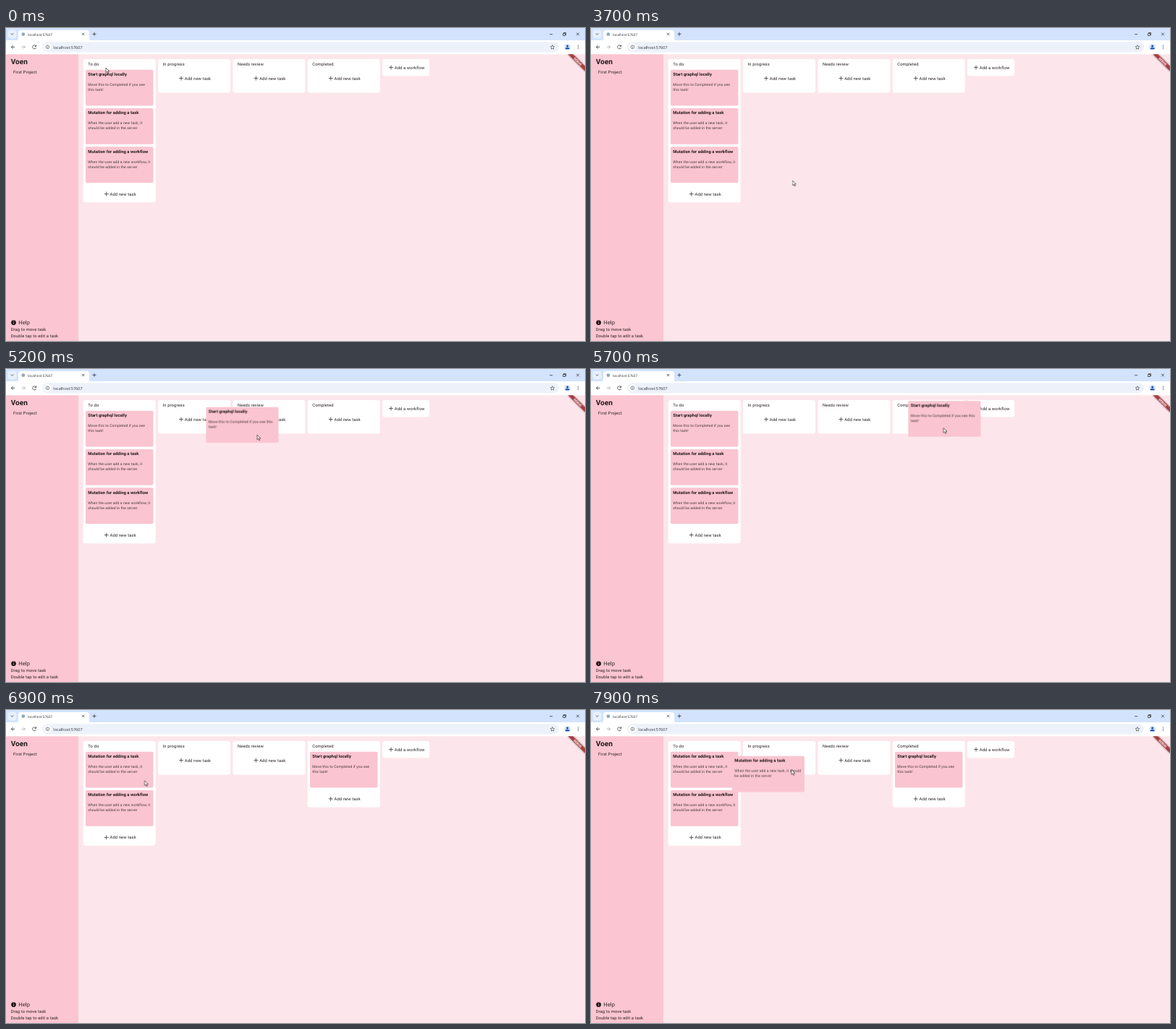
These frames come from a looping animation (800 by 433 pixels, 8000 ms). An HTML page:

```html
<!DOCTYPE html>
<html lang="en">
<head>
<meta charset="utf-8">
<title>Task board</title>
<style>
  html, body { margin: 0; width: 100%; height: 100%; overflow: hidden; background: #fde6eb; }
  svg { display: block; }
  text { font: 5.83px Roboto, sans-serif; letter-spacing: .104px; fill: #2a2224; text-rendering: geometricPrecision; white-space: pre; }
  .title { font-weight: 700; letter-spacing: .04px; fill: #20181a; }
  .body { font-size: 5px; fill: #44383b; }
  .chrome { font-family: "Open Sans", sans-serif; letter-spacing: 0; fill: #2b2e33; }
  .card { fill: #fac4d0; }
  .line { fill: none; stroke: #33363a; stroke-width: .8; }

  #before, #after, #drag1, #drag2 { animation: 8s step-end infinite; }
  #before { animation-name: before; }
  #after { animation-name: after; }
  #drag1 { animation-name: show1; }
  #drag2 { animation-name: show2; }
  #drag1 > g { animation: move1 8s infinite; }
  #drag2 > g { animation: move2 8s infinite; }
  #cursor { animation: cursor 8s infinite; }

  @keyframes before { 0% { opacity: 1 } 73.75%, 100% { opacity: 0 } }
  @keyframes after { 0% { opacity: 0 } 73.75%, 100% { opacity: 1 } }
  @keyframes show1 { 0% { opacity: 0 } 61.25% { opacity: 1 } 73.75%, 100% { opacity: 0 } }
  @keyframes show2 { 0% { opacity: 0 } 93.75%, 100% { opacity: 1 } }

  /* One step per 100 ms */
  @keyframes move1 {
    0%, 61.25% { transform: translate(129px, 57.7px); animation-timing-function: steps(6) }
    68.75% { transform: translate(424px, 47px); animation-timing-function: steps(2) }
    71.25%, 100% { transform: translate(438.4px, 44px) }
  }
  @keyframes move2 {
    0%, 93.75% { transform: translate(112px, 60px); animation-timing-function: steps(2) }
    96.25% { transform: translate(145px, 67px); animation-timing-function: steps(2) }
    98.75%, 100% { transform: translate(195px, 63.7px) }
  }
  @keyframes cursor {
    0% { transform: translate(138px, 55px); animation-timing-function: steps(2) }
    2.5% { transform: translate(106px, 56.5px); animation-timing-function: step-end }
    7.5% { transform: translate(107px, 57px); animation-timing-function: step-end }
    8.75%, 28.75% { transform: translate(108px, 57px); animation-timing-function: steps(5) }
    35% { transform: translate(190px, 164px); animation-timing-function: steps(4) }
    40% { transform: translate(268px, 290px); animation-timing-function: steps(3) }
    43.75% { transform: translate(282px, 240px); animation-timing-function: steps(2) }
    46.25%, 50% { transform: translate(278.5px, 211px); animation-timing-function: steps(5) }
    56.25%, 58.75% { transform: translate(172px, 97px); animation-timing-function: steps(2) }
    61.25% { transform: translate(222px, 97px); animation-timing-function: steps(6) }
    68.75% { transform: translate(472px, 85px); animation-timing-function: steps(2) }
    71.25%, 76.25% { transform: translate(487px, 81.5px); animation-timing-function: steps(4) }
    81.25% { transform: translate(360px, 100px); animation-timing-function: steps(2) }
    83.75% { transform: translate(195px, 118px); animation-timing-function: steps(2) }
    86.25%, 92.5% { transform: translate(191.5px, 97.7px); animation-timing-function: steps(5) }
    98.75%, 100% { transform: translate(277px, 82.5px) }
  }
</style>
</head>
<body>
<svg width="800" height="433" viewBox="0 0 800 433">
  <defs>
    <clipPath id="page"><rect y="36.3" width="800" height="397"/></clipPath>
    <filter id="blur" x="-50%" y="-100%" width="200%" height="300%"><feGaussianBlur stdDeviation="1.2"/></filter>
  </defs>

  <rect width="800" height="433" fill="#fde6eb"/>
  <rect y="36" width="100" height="397" fill="#fbc5d1"/>

  <!-- Browser window -->
  <rect width="800" height="17.5" fill="#d3e3fd"/>
  <rect y="17" width="800" height="19.3" fill="#fff"/>
  <path d="M13.5 17.5q3.5 0 3.5-3.5V6.500q0-3.500 3.500-3.500H111.500q3.500 0 3.500 3.500V14q0 3.500 3.500 3.500z" fill="#fff"/>
  <rect x="2.700" y="2.700" width="11.600" height="11.600" rx="3.500" fill="#e8f0fe"/>
  <path class="line" d="M6.700 7.500l1.800 1.800 1.800-1.800"/>
  <circle cx="23.800" cy="8.700" r="2.400" fill="#93a7bb"/>
  <text class="chrome" x="30" y="10.500" style="font-size:4.680px">localhost:57607</text>
  <path class="line" d="M105 6.800l3.200 3.200m0-3.200l-3.200 3.200M119.500 8.400h5m-2.500-2.500v5"/>
  <path class="line" stroke-width=".6" d="M751.200 8.700h4M769.600 7.500h3v3h-3zM770.600 7.300V6.500h3v3h-.8M788.200 6.600l3.700 3.700m0-3.700l-3.700 3.700"/>
  <path class="line" d="M12.200 26.300H7.300m2.400-2.400l-2.400 2.400 2.400 2.400"/>
  <path class="line" style="stroke:#a9abae" d="M21.500 26.300h4.900m-2.400-2.400l2.400 2.400-2.400 2.400"/>
  <path class="line" d="M41.300 25a2.500 2.500 0 1 0 .2 2.200M41.700 23.400v2h-2"/>
  <rect x="50" y="19.200" width="714" height="14.200" rx="7.100" fill="#edf2fa"/>
  <circle cx="57.400" cy="26.300" r="5" fill="#fff"/>
  <circle class="line" cx="57.400" cy="26.300" r="2.400" style="stroke-width:.6"/>
  <path class="line" style="stroke-width:.7" d="M57.400 26v1.500m0-2.800v.6"/>
  <text class="chrome" x="65.300" y="28.500" style="font-size:5.500px">localhost:57607</text>
  <path class="line" style="stroke-width:.6" d="M755 23.600l.8 1.900 2 .2-1.500 1.400.4 2-1.700-1-1.700 1 .4-2-1.500-1.400 2-.2z"/>
  <circle cx="775.700" cy="26.300" r="4.400" fill="#d3e3fd"/>
  <path d="M772.700 29.200v-.5q0-1.600 3-1.600t3 1.600v.5z" fill="#174ea6"/>
  <circle cx="775.700" cy="24.900" r="1.500" fill="#174ea6"/>
  <g fill="#33363a"><circle cx="790.500" cy="24.100" r=".6"/><circle cx="790.500" cy="26.300" r=".6"/><circle cx="790.500" cy="28.500" r=".6"/></g>

  <!-- Sidebar -->
  <text class="title" x="6.700" y="50.200" style="font-size:10px">Voen</text>
  <text x="10" y="63.300">First Project</text>
  <circle cx="10.500" cy="407.600" r="3.400" fill="#20181a"/>
  <path d="M10.500 407.200v2.100m0-3.900v.8" stroke="#fbc5d1" stroke-width=".8"/>
  <text x="17.300" y="410.400" style="font-size:7.500px">Help</text>
  <text x="6.700" y="419.300">Drag to move task</text>
  <text x="6.700" y="427.700">Double tap to edit a task</text>

  <g id="board"></g>

  <!-- Corner banner -->
  <g clip-path="url(#page)">
    <g transform="translate(800 36.300) rotate(45)">
      <rect x="-16.670" y="11.670" width="33.330" height="5" opacity=".5" filter="url(#blur)"/>
      <rect x="-16.670" y="11.670" width="33.330" height="5" fill="#b71c1c" fill-opacity=".63"/>
      <text y="15.700" text-anchor="middle" style="font-size:4.250px;font-weight:900;fill:#fff;letter-spacing:0">DEBUG</text>
    </g>
  </g>

  <g id="drag1"><g></g></g>
  <g id="drag2"><g></g></g>
  <path id="cursor" d="M0 0V6.700L1.600 5.300 2.700 7.800 3.800 7.300 2.700 4.900H4.900z" fill="#fff" stroke="#222" stroke-width=".65" stroke-linejoin="round"/>
</svg>
<script>
  const PITCH = 160 / 3;
  const START = {
    title: 'Start graphql locally',
    lines: ['Move this to Completed if you see', 'this task!'],
    wide: ['Move this to Completed if you see this', 'task!']
  };
  const TASK = {
    title: 'Mutation for adding a task',
    lines: ['When the user add a new task, it', 'should be added in the server'],
    wide: ['When the user add a new task, it should', 'be added in the server']
  };
  const FLOW = {
    title: 'Mutation for adding a workflow',
    lines: ['When the user add a new workflow, it', 'should be added in the server']
  };

  const rect = (x, y, w, h, r, attrs) => `<rect x="${x}" y="${y}" width="${w}" height="${h}" rx="${r}" ${attrs}/>`;
  const text = (x, y, s, cls = '') => `<text x="${x}" y="${y}" class="${cls}">${s}</text>`;

  const card = (task, width, lines) =>
    rect(0, 0, width, 49.8, 1.7, 'class="card"') +
    text(3.3, 8.3, task.title, 'title') +
    lines.map((s, i) => text(3.3, 22.3 + 7.1 * i, s, 'body')).join('');

  const add = (x, y, label) =>
    `<path class="line" d="M${x - 2.9} ${y}h5.800m-2.900-2.900v5.800"/>` + text(x + 4.8, y + 2.1, label);

  function column(index, name, tasks = []) {
    const x = 106.7 + index * 310 / 3, n = tasks.length;
    const height = n ? 38.2 + PITCH * n : 46.5;
    return rect(x, 43, 100, height, 3, 'fill="#fff"') +
      text(x + 6.6, 52.4, name) +
      tasks.map((t, i) =>
        `<g transform="translate(${x + 3.3} ${57.7 + PITCH * i})">${card(t, 93.4, t.lines)}</g>`).join('') +
      add(x + 32, 69.6 + PITCH * n, 'Add new task');
  }

  const fill = (selector, html) => { document.querySelector(selector).innerHTML = html; };

  fill('#board',
    column(1, 'In progress') + column(2, 'Needs review') +
    rect(520, 43, 65, 23.3, 3, 'fill="#fff"') + add(532, 54.6, 'Add a workflow') +
    `<g id="before">${column(0, 'To do', [START, TASK, FLOW])}${column(3, 'Completed')}</g>` +
    `<g id="after">${column(0, 'To do', [TASK, FLOW])}${column(3, 'Completed', [START])}</g>`);
  fill('#drag1 > g', card(START, 100, START.wide));
  fill('#drag2 > g', card(TASK, 100, TASK.wide));
</script>
</body>
</html>
```
